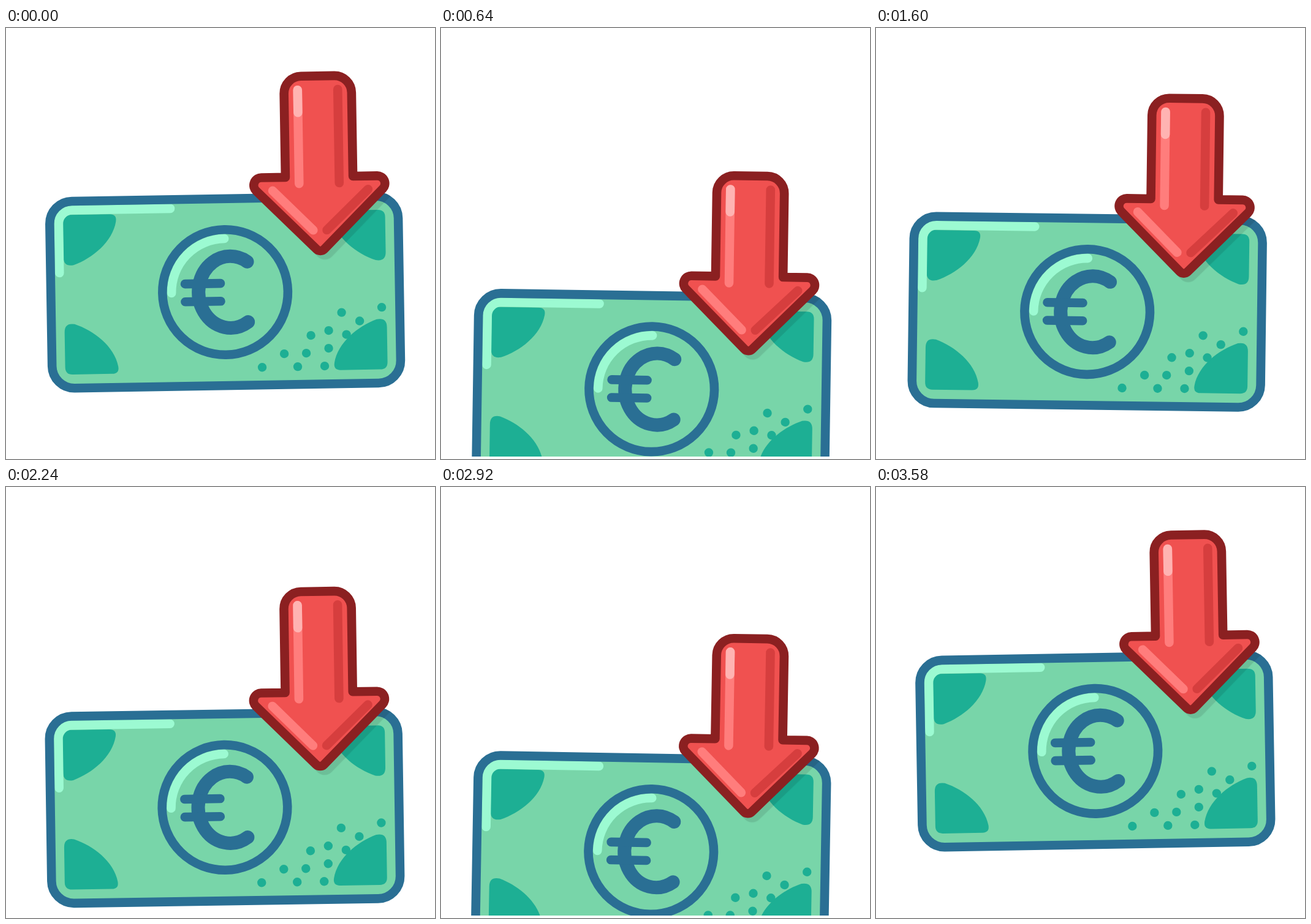
These frames come from a looping animation (700x704 px, 3.6 s). An HTML page with a canvas:

```html
<!DOCTYPE html>
<html lang="en">
<head>
<meta charset="utf-8">
<title>Banknote with falling arrow</title>
<style>
  html, body { margin: 0; width: 100%; height: 100%; overflow: hidden; background: #fff; }
  canvas { display: block; }
</style>
</head>
<body>
<canvas id="stage" width="700" height="704"></canvas>
<script>
const ctx = document.getElementById('stage').getContext('2d');
const TAU = Math.PI * 2;
const LOOP = 3600, STEP = 20, FLOOR = 700;
const LINE = 14.6;
const CENTER = { x: 350.4, y: 437.3 };
const COLOR = {
  bill: '#78d5a9', teal: '#1daf94', blue: '#2a6f94', mint: '#9cfad2',
  red: '#f05150', darkRed: '#8b2021', shade: '#d63e3e', light: '#ff7d7c', glint: '#ffb3b2'
};
const DOTS = [
  [408.8, 561], [445.2, 539.5], [466.8, 560.9], [481.2, 539.1],
  [489.2, 510.2], [510.8, 560.6], [517.8, 531.7], [518.3, 502.7],
  [539.8, 473.6], [547.2, 509.7], [569.1, 488], [605.4, 466.2]
];

const noteOutline = new Path2D();
noteOutline.roundRect(66, 284.6, 568.8, 305.4, 36.5);
const noteSilhouette = new Path2D();
noteSilhouette.roundRect(58.7, 277.3, 583.4, 320, 43.8);

const cornerPatch = new Path2D(
  'M99.5 307H164Q176 307 174 319C168 352 135 378 104 389Q87.4 392 87.4 376V319Q87.4 307 99.5 307Z');
const noteShine = new Path2D('M80.6 401.4V321.2A22 22 0 0 1 102.6 299.2H263.1');
const arrowShape = makeArrow();

function makeArrow() {
  const path = document.createElement('canvas').getContext('2d') && new Path2D();
  const left = 451.8, right = 562, top = 86.7, shoulder = 251.3, mid = 507;
  const k = 12.5 * (1 + Math.SQRT2);      // tangent length at the 45 degree head corners
  const d = k / Math.SQRT2;
  const wingL = 382.3, wingR = 2 * mid - wingL;
  path.moveTo(left + 28, top);
  path.lineTo(right - 28, top);
  path.arcTo(right, top, right, top + 28, 28);
  path.lineTo(right, shoulder);
  path.lineTo(wingR - k, shoulder);
  path.arcTo(wingR, shoulder, wingR - d, shoulder + d, 12.5);
  path.arcTo(mid, shoulder + mid - wingL, wingL + d, shoulder + d, 9);
  path.lineTo(wingL + d, shoulder + d);
  path.arcTo(wingL, shoulder, wingL + k, shoulder, 12.5);
  path.lineTo(left, shoulder);
  path.lineTo(left, top + 28);
  path.arcTo(left, top, left + 28, top, 28);
  path.closePath();
  return path;
}

function stroke(path, color, width = LINE) {
  ctx.strokeStyle = color;
  ctx.lineWidth = width;
  ctx.stroke(path);
}

function fill(path, color) {
  ctx.fillStyle = color;
  ctx.fill(path);
}

function bar(x1, y1, x2, y2, color) {
  const path = new Path2D();
  path.moveTo(x1, y1);
  path.lineTo(x2, y2);
  stroke(path, color);
}

function arc(x, y, rx, ry, from, to, color, width) {
  const path = new Path2D();
  path.ellipse(x, y, rx, ry, 0, from, to);
  stroke(path, color, width);
}

function drawNote() {
  const { x, y } = CENTER;
  fill(noteOutline, COLOR.bill);
  for (const sx of [1, -1]) {
    for (const sy of [1, -1]) {
      ctx.save();
      ctx.translate(x, y);
      ctx.scale(sx, sy);
      ctx.translate(-x, -y);
      fill(cornerPatch, COLOR.teal);
      ctx.restore();
    }
  }
  for (const [dx, dy] of DOTS) {
    const dot = new Path2D();
    dot.arc(dx, dy, 7.2, 0, TAU);
    fill(dot, COLOR.teal);
  }
  stroke(noteShine, COLOR.mint);
  stroke(noteOutline, COLOR.blue);

  arc(x, y, 87.5, 87.5, Math.PI, Math.PI * 1.5, COLOR.mint);
  arc(x, y, 102.3, 102.3, 0, TAU, COLOR.blue);
  arc(359, y, 52, 58.5, 1, TAU - 1, COLOR.blue, 22);
  bar(285, 422.8, 343, 422.8, COLOR.blue);
  bar(285, 452, 343, 452, COLOR.blue);
}

function drawShadow() {
  ctx.save();
  ctx.clip(noteSilhouette);
  ctx.translate(7.2, 7.2);
  // The combined outline and body are filled once so the tint stays even.
  ctx.shadowColor = 'rgba(0,0,0,0)';
  const tint = shadowLayer();
  ctx.globalAlpha = 0.1;
  ctx.drawImage(tint, 0, 0);
  ctx.restore();
}

let shadowCanvas;
function shadowLayer() {
  if (shadowCanvas) return shadowCanvas;
  shadowCanvas = document.createElement('canvas');
  shadowCanvas.width = 700;
  shadowCanvas.height = 704;
  const layer = shadowCanvas.getContext('2d');
  layer.lineJoin = 'round';
  layer.lineWidth = LINE;
  layer.fill(arrowShape);
  layer.stroke(arrowShape);
  return shadowCanvas;
}

function drawArrow() {
  fill(arrowShape, COLOR.red);
  bar(474, 109, 474, 262, COLOR.light);
  bar(474, 109, 474, 146, COLOR.glint);
  bar(539.5, 109, 539.5, 262, COLOR.shade);
  bar(430.6, 273, 495.8, 338.4, COLOR.light);
  bar(586.4, 273, 518, 338.6, COLOR.shade);
  stroke(arrowShape, COLOR.darkRed);
}

// Three sways and two slow dips per loop.
function pose(t) {
  const bob = TAU * (t + 10) / 1800;
  return {
    angle: -Math.cos(TAU * (t + 60) / 1200) * Math.PI / 180,
    drop: 91.5 * (1 - Math.cos(bob)) + 2 * (Math.cos(bob) - Math.cos(3 * bob))
  };
}

function draw(t) {
  const { angle, drop } = pose(t);
  ctx.setTransform(1, 0, 0, 1, 0, 0);
  ctx.fillStyle = '#fff';
  ctx.fillRect(0, 0, 700, 704);
  ctx.save();
  ctx.beginPath();
  ctx.rect(0, 0, 700, FLOOR);
  ctx.clip();
  ctx.translate(0, drop);
  ctx.rotate(angle);
  ctx.lineCap = ctx.lineJoin = 'round';
  drawNote();
  drawShadow();
  drawArrow();
  ctx.restore();
}

const start = performance.now();
function tick() {
  const elapsed = (performance.now() - start) % LOOP;
  draw(Math.floor(elapsed / STEP) * STEP);
  requestAnimationFrame(tick);
}
tick();
</script>
</body>
</html>
```
